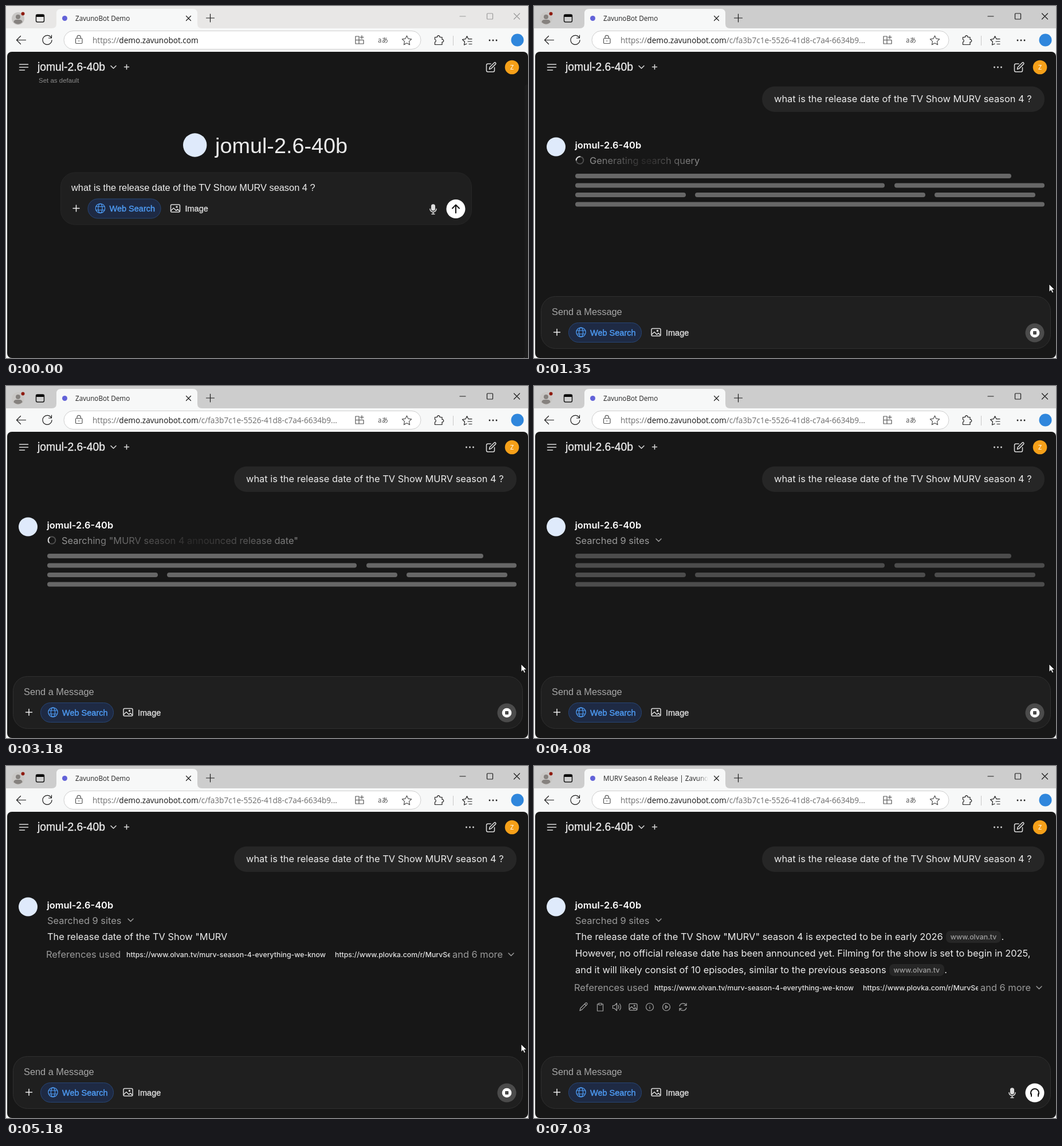
Write an HTML page that moves like this. It is 911 px wide and 615 px high and loops after 7.07 s.

```html
<!DOCTYPE html>
<html lang="en">
<head>
<meta charset="utf-8">
<title>Chat demo</title>
<style>
  html, body { margin: 0; width: 100%; height: 100%; overflow: hidden; background: #f7f8f8; }
  #stage { position: relative; width: 911px; height: 615px; overflow: hidden; }
  svg { position: absolute; left: 0; top: 0; display: block; }
  text { fill: currentColor; white-space: pre; }
  .ui { font-family: "Open Sans", sans-serif; font-size: 11.7px; }
  .url { font-size: 13.6px; }
  .head { font-family: "Liberation Sans", Arial, sans-serif; font-size: 16.35px; }
  .tool { font-size: 14.5px; }
  .medium { stroke: currentColor; stroke-width: .35px; }
  .body, #answer { font-family: Inter, sans-serif; font-size: 16.4px; }
  .small, .pill { font-size: 12.3px; font-weight: 500; }
  .line { fill: none; stroke: currentColor; stroke-width: 1.5; stroke-linecap: round; stroke-linejoin: round; }
  .thin { stroke-width: 1.2; }
  .thick { stroke-width: 2; }
  #answer { position: absolute; left: 72px; top: 284px; color: #ececec; }
  #answer p { margin: 0; height: 29px; line-height: 29px; white-space: pre; }
  .pill { display: inline-block; height: 21px; line-height: 21px; margin-left: 5px; padding: 0 8px;
    border-radius: 8px; background: #262626; color: #a0a0a0; vertical-align: 1px; }
  [hidden] { display: none !important; }
</style>
</head>
<body>
<div id="stage">
<svg width="911" height="615" viewBox="0 0 911 615">
  <defs>
    <linearGradient id="shimmer" gradientUnits="userSpaceOnUse" spreadMethod="repeat" y1="0" y2="0">
      <stop offset=".25" stop-color="#919191"/>
      <stop offset=".5" stop-color="#2a2929"/>
      <stop offset=".75" stop-color="#919191"/>
    </linearGradient>
    <linearGradient id="fade">
      <stop offset="0" stop-color="#f7f8f8" stop-opacity="0"/>
      <stop offset="1" stop-color="#f7f8f8"/>
    </linearGradient>
    <clipPath id="tabClip"><rect x="121" y="10" width="183" height="24"/></clipPath>
    <clipPath id="refClip"><rect x="574" y="318" width="201" height="24"/></clipPath>
    <path id="chevron" class="line" d="M-4.5-2 0 2.5 4.5-2"/>
    <g id="picture" class="line">
      <rect x="-8" y="-6.5" width="16" height="13" rx="2"/>
      <path d="M-7.5 4-3-.5 1.5 4 4 1.5 7.5 5"/><circle cx="2.5" cy="-2.5" r="1"/>
    </g>
    <g id="mic" class="line">
      <rect x="-2.8" y="-8" width="5.6" height="10" rx="2.8" fill="currentColor"/>
      <path d="M-5.5-.5a5.5 5.5 0 0 0 11 0M0 5v3.5M-2.5 8.5h5"/>
    </g>
    <g id="dots" fill="currentColor"><circle cx="-6" r="1.4"/><circle r="1.4"/><circle cx="6" r="1.4"/></g>
    <g id="tools">
      <path class="line" d="M34.5 570h11M40 564.5v11" color="#eee"/>
      <rect x="60.5" y="553.5" width="127" height="34" rx="17" fill="#1e2a44" stroke="#274675"/>
      <g color="#4f9ef8">
        <g class="line thin">
          <circle cx="82" cy="570" r="8.2"/><ellipse cx="82" cy="570" rx="3.6" ry="8.2"/>
          <path d="M74.5 567h15M74.5 573h15"/>
        </g>
        <text class="head tool medium" x="98" y="575.5">Web Search</text>
      </g>
      <g color="#dcdcdc">
        <use href="#picture" x="213" y="570"/>
        <text class="head tool medium" x="230" y="575.5">Image</text>
      </g>
    </g>
  </defs>

  <!-- browser frame -->
  <rect id="bar" width="911" height="40"/>
  <rect y="39" width="911" height="576" fill="#f7f8f8"/>
  <path d="M80 39q8 0 8-8V13q0-8 8-8H326q8 0 8 8V31q0 8 8 8z" fill="#f7f8f8"/>
  <circle cx="21" cy="22" r="11" fill="#c9c7c5"/>
  <g fill="#85817e"><circle cx="21" cy="19" r="4"/><path d="M13.5 28.5q0-4.5 4.5-4.5h6q4.5 0 4.5 4.5-7.5 6.5-15 0z"/></g>
  <circle cx="29.5" cy="13.5" r="3" fill="#8e1b10"/>
  <g color="#1d1d1d">
    <rect class="line" x="52.5" y="15" width="14" height="13" rx="2.5"/>
    <path d="M52.5 15h14v4h-14z"/>
    <g class="line thin">
      <path d="M314.5 17.5l8 8m0-8-8 8M349.5 21h14M356.5 14v14"/>
      <path d="M34.5 59.5h-16m7-7-7 7 7 7M79 55.5a8 8 0 1 0 1 4M79.5 51v5h-5"/>
    </g>
  </g>
  <circle cx="102.5" cy="21.5" r="4.5" fill="#6262d8"/>
  <g class="ui" color="#222" clip-path="url(#tabClip)">
    <text x="121" y="25.5" data-t="0,6040">ZavunoBot Demo</text>
    <g data-t="6040,7070">
      <text x="121" y="25.5">MURV Season 4 Release | ZavunoBot</text>
      <rect x="286" y="10" width="18" height="24" fill="url(#fade)"/>
    </g>
  </g>
  <g id="buttons" class="line thin">
    <path d="M792 18h10M886.5 13l10 10m0-10-10 10"/><rect x="839.5" y="13" width="10" height="10" rx="1"/>
  </g>
  <rect x="101" y="43.5" width="623" height="32" rx="16" fill="#fff" stroke="#cfcfcf"/>
  <g color="#555" class="line thin">
    <rect x="121.5" y="56.5" width="11.5" height="9" rx="1.5"/>
    <path d="M124 56v-1.5a3.2 3.2 0 0 1 6.4 0V56M127.2 60.5v1"/>
    <path d="M610 53h6v13h-6zM610 59.5h14V66h-8M621 51.5v6M618 54.5h6"/>
    <path d="M699.5 52l2.5 5.2 5.7.7-4.2 4 1.1 5.7-5.1-2.8-5.1 2.8 1.1-5.7-4.2-4 5.7-.7z"/>
  </g>
  <text x="649" y="63.5" color="#555" font-size="11.5" font-family="Noto Sans CJK JP, Noto Sans CJK, sans-serif">aあ</text>
  <g color="#222">
    <g class="line thin">
      <path d="M748.5 54.5h4a2.3 2.3 0 1 1 4.5 0h4v4a2.3 2.3 0 1 1 0 4.500v4.500h-12.5v-4.500a2.3 2.3 0 0 0 0-4.500z"/>
      <path d="M804 66l-4.5 2 1-5.5-4-4 5.5-.8 2.5-5 2.5 5H813M806 62h7M808 66.5h5"/>
    </g>
    <use href="#dots" x="850" y="60"/>
  </g>
  <path d="M780.5 52v17" stroke="#c8c8c8"/>
  <circle cx="892.5" cy="59.5" r="11" fill="#2f86dc"/>
  <text class="ui url" x="151" y="64.5" color="#151515"><tspan fill="#6c6c6c">https://</tspan>demo.zavunobot.com<tspan fill="#6c6c6c" data-t="650,7070">/c/fa3b7c1e-5526-41d8-c7a4-6634b9...</tspan></text>

  <!-- page -->
  <rect x="2" y="80" width="909" height="535" rx="8" fill="#171717"/>
  <g color="#dcdcdc">
    <path class="line" d="M23.5 102h15M23.5 107h15M23.5 112h9"/>
    <text class="head medium" x="55" y="113" color="#ececec" style="font-size:19.3px">jomul-2.6-40b</text>
    <use href="#chevron" x="187.5" y="106.5"/>
    <path class="line" d="M206.5 106.5h8M210.5 102.5v8"/>
    <path class="line" d="M846 101h-5q-2.5 0-2.5 2.5v9q0 2.5 2.5 2.5h9q2.5 0 2.5-2.5v-5M843.5 110.5l.7-3.5 8-8q1.2-.8 2.2.2t.2 2.2l-8 8z"/>
    <use href="#dots" x="809.5" y="107" data-t="650,7070"/>
  </g>
  <circle cx="883" cy="107" r="12.3" fill="#f5a019"/>
  <text class="body" x="883" y="110.8" text-anchor="middle" color="#fff" style="font-size:10.5px">Z</text>

  <!-- start view -->
  <g data-t="0,650">
    <path d="M905 615V141q0-4 6-4v478z" fill="#1c1c1c"/>
    <text class="head" x="57" y="134" color="#8c8c8c" style="font-size:11.5px">Set as default</text>
    <circle cx="329.7" cy="243" r="20.7" fill="#dfeafb"/>
    <text class="head" x="365" y="256.5" color="#ececec" style="font-size:37.8px">jomul-2.6-40b</text>
    <rect x="95.5" y="291" width="717" height="91" rx="25" fill="#1f1f1f" stroke="#262626"/>
    <text class="head" x="114" y="323" color="#f0f0f0">what is the release date of the TV Show MURV season 4 ?</text>
    <use href="#tools" x="82.5" y="-216.5"/>
    <use href="#mic" x="745.5" y="355" color="#ddd"/>
    <circle cx="785" cy="354.5" r="16.5" fill="#fff"/>
    <path class="line thick" d="M785 361.5v-14m-6 6 6-6 6 6" color="#111"/>
  </g>

  <!-- conversation -->
  <g data-t="650,7070">
    <rect x="398" y="140.5" width="493" height="44.5" rx="22" fill="#262626"/>
    <text class="body" x="419" y="168" color="#ececec">what is the release date of the TV Show MURV season 4 ?</text>
    <circle cx="38.5" cy="246" r="16.5" fill="#dfeafb"/>
    <text class="body" x="71.5" y="249" color="#fff" font-weight="600">jomul-2.6-40b</text>
    <text class="body small" x="192" y="248" color="#b4b4b4" data-t="650,1000">Today at 9:24 PM</text>

    <g data-t="1000,3560">
      <g class="line thick">
        <circle cx="80" cy="269.5" r="6.3" stroke="#4c4c4c"/>
        <path id="spinner" d="M73.7 269.5a6.3 6.3 0 0 1 6.3-6.3" stroke="#d8d8d8"/>
      </g>
      <text id="status" class="body" x="97" y="275.5" style="fill:url(#shimmer)"></text>
    </g>
    <g data-t="3560,7070" color="#9a9a9a">
      <text class="body" x="72" y="275.5">Searched 9 sites</text>
      <use href="#chevron" x="217.5" y="269"/>
    </g>
    <g id="skeleton" data-t="650,5040" stroke="#676767" stroke-width="8" stroke-linecap="round">
      <path d="M76 297H829M76 313.5H608M633 313.5H887M76 330H261M285 330H679M703 330H871M76 346.5H887"/>
    </g>

    <g id="refs" data-t="5040,7070" color="#9a9a9a">
      <text class="body" x="70" y="335">References used</text>
      <text class="body small" x="210" y="334" color="#e4e4e4">https://www.olvan.tv/murv-season-4-everything-we-know</text>
      <text class="body small" x="574" y="334" color="#e4e4e4" clip-path="url(#refClip)">https://www.plovka.com/r/MurvSeries</text>
      <text class="body" x="779" y="335">and 6 more</text>
      <use href="#chevron" x="881.5" y="329"/>
    </g>

    <g class="line thin" color="#a3a3a3" data-t="5720,7070">
      <path d="M80 427.5l1.2-4.5 9-9q1.2-.8 2.3.3t.2 2.3l-9 9zM88.5 416l2.5 2.5"/>
      <path d="M113 416h-2.5v12h10v-12H118M113 414.5h5v3h-5z"/>
      <path d="M137.5 418.5h3l4-4v13l-4-4h-3zM147 418q2 3 0 6M149.5 415.5q4 5.5 0 11"/>
      <use href="#picture" transform="translate(173 421) scale(.87)"/>
      <circle cx="202" cy="421" r="6.5"/><path d="M202 420.5v3.5M202 418v.1"/>
      <circle cx="231" cy="421" r="6.5"/><path d="M229.5 418.5v5l4-2.5z"/>
      <path d="M254 419.5a6.3 6.3 0 0 1 11.5-1.5M266 414.5v4h-4M266 422.5a6.3 6.3 0 0 1-11.5 1.5M254 427.5v-4h4"/>
    </g>

    <rect x="12.5" y="507.5" width="889" height="91" rx="25" fill="#1f1f1f" stroke="#303030"/>
    <text class="head" x="31" y="540" color="#a6a6a6">Send a Message</text>
    <rect id="caret" x="31" y="525" width="1" height="18" fill="#fff"/>
    <use href="#tools"/>
    <g data-t="650,5720">
      <circle cx="874" cy="571" r="16.5" fill="#4b4b4b"/><circle cx="874" cy="571" r="8.3" fill="#fff"/>
      <rect x="871" y="568" width="6" height="6" rx="1" fill="#4b4b4b"/>
    </g>
    <g data-t="5720,7070">
      <use href="#mic" x="834.5" y="571" color="#ddd"/>
      <circle cx="874" cy="571" r="16.5" fill="#fff"/>
      <path class="line thick" d="M867 573v-2a7 7 0 0 1 14 0v2M868 573v4M880 573v4" color="#111"/>
    </g>
  </g>
</svg>
<div id="answer"></div>
<svg width="911" height="615" viewBox="0 0 911 615">
  <path id="cursor" d="M0 0V13.5L3.2 10.6 5.3 15.3 7.6 14.3 5.6 9.7H9.8z" fill="#fff" stroke="#000" stroke-width=".8"/>
</svg>
</div>
<script>
  const LOOP = 7070, BLINK = 163.9;
  const $ = id => document.getElementById(id);
  const show = (el, on) => el.style.display = on ? '' : 'none';

  const timed = [...document.querySelectorAll('[data-t]')].map(el => {
    const [start, end] = el.dataset.t.split(',').map(Number);
    return { el, start, end };
  });

  const statuses = [
    [0, 'Generating search query'],
    [1700, 'Searching "MURV season 4 release date"'],
    [2600, 'Searching "MURV season 4 announced release date"']
  ];

  // the skeleton's pulse is only repainted at these times
  const repaints = [3520, 3700, 3920, 4240, 4400, 4540, 4860];

  // time, x, y of the pointer tip
  const pointer = [
    [80, 832, 594], [440, 784, 350], [650, 784, 350], [790, 685, 327],
    [910, 685, 327], [1330, 899, 486], [6680, 899, 486], [6850, 897, 618]
  ];

  const site = 'www.olvan.tv';
  const lines = [
    ['The release date of the TV Show "MURV" season 4 is expected to be in early 2026', site, '.'],
    ['However, no official release date has been announced yet. Filming for the show is set to begin in 2025,'],
    ['and it will likely consist of 10 episodes, similar to the previous seasons', site, '.']
  ];
  const parts = lines.flatMap((line, row) => {
    const p = $('answer').appendChild(document.createElement('p'));
    return line.map(text => {
      const el = p.appendChild(document.createElement('span'));
      const pill = text === site;
      if (pill) { el.className = 'pill'; el.textContent = text; }
      return { el, text, pill, row, size: pill ? 8 : text.length };
    });
  });

  function type(t) {
    const step = t < 5040 ? 0 : Math.floor((t - 5040) / 45) + 1;
    let left = step <= 4 ? step * 9.25 : 37 + (step - 4) * 22;
    let row = 0;
    for (const part of parts) {
      if (left > 0) row = part.row;
      if (part.pill) part.el.hidden = left <= 0;
      else part.el.textContent = part.text.slice(0, Math.max(0, left));
      left -= part.size;
    }
    $('refs').setAttribute('transform', `translate(0 ${row * 29})`);
  }

  function shimmer(t) {
    const text = statuses.filter(s => s[0] <= t).pop()[1], label = $('status');
    if (label.textContent !== text) label.textContent = text;
    const width = label.getComputedTextLength();
    const start = 97 - width + 2 * width * ((t - 1350) / 605 + .255);
    $('shimmer').setAttribute('x1', start);
    $('shimmer').setAttribute('x2', start + 2 * width);
    $('spinner').setAttribute('transform', `rotate(${(t - 1350) / 232 * 360} 80 269.5)`);
  }

  function pulse(t) {
    const beat = repaints.filter(r => r <= t).pop();
    const opacity = beat ? .75 + .25 * Math.cos((beat - 3490) / 620 * 2 * Math.PI) : 1;
    $('skeleton').setAttribute('opacity', opacity);
    $('skeleton').setAttribute('transform', `translate(0 ${t < 1000 ? -29 : 0})`);
  }

  function movePointer(t) {
    const next = pointer.findIndex(p => p[0] > t);
    show($('cursor'), next > 0);
    if (next < 1) return;
    const [a, x, y] = pointer[next - 1], [b, x2, y2] = pointer[next];
    const k = (t - a) / (b - a), e = k * k * (3 - 2 * k);
    $('cursor').setAttribute('transform', `translate(${x + (x2 - x) * e} ${y + (y2 - y) * e})`);
  }

  function draw(t) {
    for (const { el, start, end } of timed) show(el, t >= start && t < end);
    const active = t >= 480;
    $('bar').setAttribute('fill', active ? '#cdcdcd' : '#e8e7e6');
    $('buttons').style.color = active ? '#1d1d1d' : '#9b9b9b';

    const blinks = t < 1400 ? (t - 650) / 180 : (t - 4080) / BLINK + 41;
    show($('caret'), Math.floor(blinks) % 2 === 0);

    if (t >= 1000 && t < 3560) shimmer(t);
    pulse(t);
    type(t);
    movePointer(t);
  }

  const begin = performance.now();
  function tick() {
    draw((performance.now() - begin) % LOOP);
    requestAnimationFrame(tick);
  }
  tick();
</script>
</body>
</html>
```
